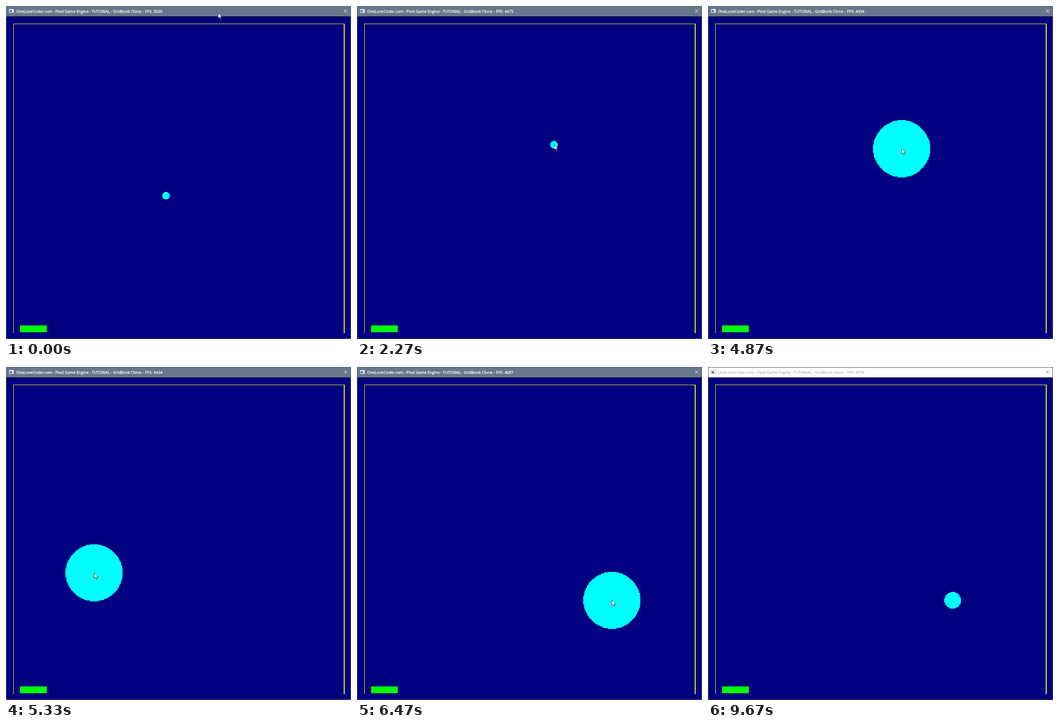
An HTML page for the animation above (9.74 s loop, 761 by 736 pixels).

```html
<!DOCTYPE html>
<html lang="en">
<head>
<meta charset="utf-8">
<title>Ball and bat</title>
<style>
  html, body { margin: 0; width: 100%; height: 100%; overflow: hidden; background: #000080; }
  svg { display: block; width: 100vw; height: 100vh; }
  text { font: 8.5px "Open Sans", "Noto Sans", sans-serif; text-rendering: geometricPrecision; white-space: pre; }
</style>
</head>
<body>
<svg viewBox="0 0 761 736">
  <rect width="761" height="736" fill="#000080"/>
  <rect width="761" height="24"/>
  <rect id="bar" width="761" height="23"/>
  <g id="caption" stroke-width=".3">
    <text x="22.5" y="14.8">OneLoneCoder.com - Pixel Game Engine - TUTORIAL - GridBonk Clone -</text>
    <text id="fps" x="306.8" y="14.8"></text>
  </g>
  <g>
    <rect x="6.5" y="6.5" width="11" height="9" fill="#8a94a2"/>
    <rect x="7" y="7" width="10" height="8" fill="#f4f6f8"/>
    <rect x="8" y="9" width="5" height="5" fill="#5d7f8c"/>
    <rect x="13.6" y="9" width="2.6" height="5" fill="#d3d9de"/>
  </g>
  <path id="close" d="M745.3 7.3l7.6 7.6m0-7.6l-7.6 7.6" fill="none"/>
  <g id="field" shape-rendering="crispEdges">
    <path d="M10 10H503V471H502V11H11V471H10Z" fill="#ff0"/>
    <rect x="20" y="460" width="40" height="10" fill="#0f0"/>
    <path id="ball" fill="#0ff"/>
  </g>
  <path id="cursor" d="M0 0V12L2.8 9.5 4.8 14 6.7 13.2 4.7 8.8H8.6Z" fill="#fff" stroke="#000" stroke-width=".75"/>
  <rect id="edge" x=".5" y=".5" width="760" height="735" fill="none"/>
</svg>
<script>
// Times are counted in ticks of 1/15 s
const LOOP = 9740, TICK = 1000 / 15;
const SCALE = 1.483, LEFT = .85, TOP = 24.1;
const $ = id => document.getElementById(id);
const set = (id, attrs) => {
  for (const k in attrs) $(id).setAttribute(k, attrs[k]);
};

// Turning points of the pointer: tick, x, y
const turns = [
  [3, 468, 15], [6, 492, 90], [16, 358, 405], [21, 260, 420], [25, 310, 460],
  [34, 435, 306.3], [41, 438, 334], [53, 427, 315], [73, 427, 315], [79, 215, 464],
  [82, 172, 410], [87, 342.5, 290], [97, 562, 515], [99, 540, 516], [108, 318, 515],
  [117, 357, 502], [122, 357, 502], [137, 88, 733]
];
const drags = [[16, 34], [70, 99]];
const grow = [43, 50, 54, 60, 65], shrink = [101, 110, 116.6, 122];
const rates = [3020, 3768, 4475, 4452, 4291, 4434, 4026, 4087, 4109, 4372, 4376];

// Monotone cubic through the turning points, so it never overshoots
function along(n, c) {
  const last = turns.length - 1;
  if (n <= turns[0][0]) return turns[0][c];
  if (n >= turns[last][0]) return turns[last][c];
  const i = turns.findIndex(k => k[0] > n) - 1;
  const span = j => turns[j + 1][0] - turns[j][0];
  const slope = j => j < 0 || j >= last ? 0 : (turns[j + 1][c] - turns[j][c]) / span(j);
  const tangent = j => {
    const a = slope(j - 1), b = slope(j);
    return a * b <= 0 ? 0 : 2 * a * b / (a + b);
  };
  const h = span(i), u = (n - turns[i][0]) / h, v = 1 - u;
  return v * v * ((1 + 2 * u) * turns[i][c] + u * h * tangent(i))
    + u * u * ((3 - 2 * u) * turns[i + 1][c] - v * h * tangent(i + 1));
}

const tip = n => [along(n, 1), along(n, 2)];

// The ball sits in the cell under the pointer while dragged, and stays where dropped
function ballCell(n) {
  const drag = drags.filter(d => d[0] <= n).pop();
  if (!drag) return [237, 266];
  const [x, y] = tip(Math.min(n, drag[1]));
  return [Math.floor((x - LEFT) / SCALE), Math.floor((y - TOP) / SCALE)];
}

// Each spin of the wheel takes three ticks
function ballRadius(n) {
  const spins = starts => starts.reduce((sum, s) => sum + Math.min(1, Math.max(0, (n - s) / 3)), 0);
  return Math.floor(5 + 7.4 * (spins(grow) - spins(shrink)));
}

// Bresenham disc as a union of centred boxes
function disc(cx, cy, r) {
  const box = (a, b) => `M${cx - a} ${cy - b}h${2 * a + 1}v${2 * b + 1}h${-2 * a - 1}z`;
  let path = "", x = 0, y = r, d = 3 - 2 * r;
  while (y >= x) {
    path += box(x, y) + box(y, x);
    d += d < 0 ? 4 * x++ + 6 : 4 * (x++ - y--) + 10;
  }
  return path;
}

function draw(ms) {
  const n = Math.floor((ms + 4) / TICK);
  const active = n < 145;
  const ink = active ? "#fff" : "#999";
  set("bar", { fill: active ? "#68778c" : "#fff" });
  set("caption", { fill: ink, stroke: active ? ink : "none" });
  set("close", { stroke: active ? "#fff" : "#777" });
  set("edge", { stroke: active ? "#56658a" : "#444" });
  $("fps").textContent = "FPS: " + rates[Math.floor((n + 8) / 15)];

  set("ball", { d: disc(...ballCell(n), ballRadius(n)) });
  set("cursor", {
    transform: `translate(${tip(n).map(Math.round)})`,
    visibility: n < 138 ? "visible" : "hidden"
  });
}

set("field", { transform: `translate(${LEFT} ${TOP}) scale(${SCALE})` });
const start = performance.now();
function loop() {
  draw((performance.now() - start) % LOOP);
  requestAnimationFrame(loop);
}
loop();
</script>
</body>
</html>
```
